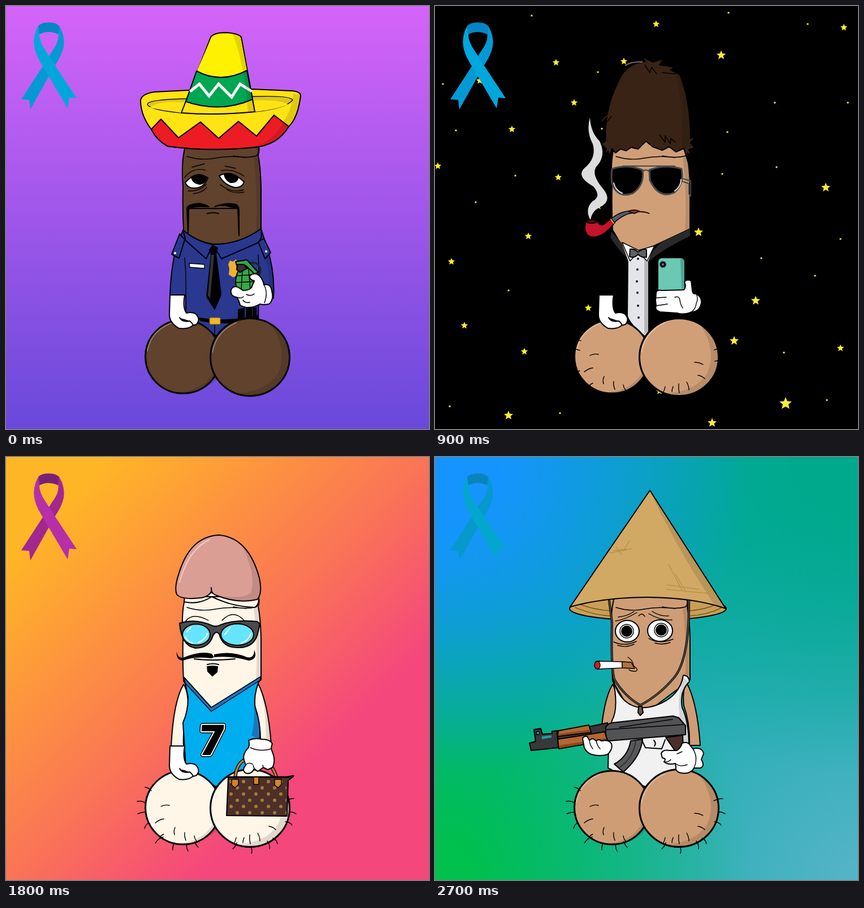
An HTML page for the animation above (3600 ms loop, 748 by 748 pixels).

```html
<!DOCTYPE html>
<html lang="en">
<head>
<meta charset="utf-8">
<title>Character cards</title>
<style>
html, body { margin: 0; width: 100%; height: 100%; overflow: hidden; background: #000 }
svg { display: block; width: 100vw; height: 100vh }
.scene { display: none }
.ink { stroke: #000; stroke-width: 2; stroke-linejoin: round; stroke-linecap: round; fill: none }
.thin { stroke-width: 1.4 }
.bold { stroke-width: 3 }
.flat { stroke: none }
.skin { fill: var(--skin) }
.shade { fill: #000; fill-opacity: .12; stroke: none }
.white { fill: #fff }
.black { fill: #000 }
</style>
</head>
<body>
<svg viewBox="0 0 748 748">
<defs>
  <linearGradient id="violet" x2="0" y2="1"><stop stop-color="#d564f9"/><stop offset="1" stop-color="#6849da"/></linearGradient>
  <linearGradient id="sunset" x2="1" y2="1"><stop offset=".12" stop-color="#ffb626"/><stop offset=".5" stop-color="#fa7456"/><stop offset=".72" stop-color="#f4487c"/></linearGradient>
  <radialGradient id="blue" cx="0" cy="0" r=".75"><stop offset=".2" stop-color="#1594ff"/><stop offset="1" stop-color="#1594ff" stop-opacity="0"/></radialGradient>
  <radialGradient id="jade" cx="1" cy="0" r=".75"><stop offset=".15" stop-color="#00a98b"/><stop offset="1" stop-color="#00a98b" stop-opacity="0"/></radialGradient>
  <radialGradient id="green" cx="0" cy="1" r=".75"><stop offset=".12" stop-color="#00c04e"/><stop offset="1" stop-color="#00c04e" stop-opacity="0"/></radialGradient>
  <radialGradient id="mist" cx="1" cy="1" r=".9"><stop offset=".05" stop-color="#52b4c6"/><stop offset="1" stop-color="#52b4c6" stop-opacity="0"/></radialGradient>
  <pattern id="dots" width="22" height="22" patternUnits="userSpaceOnUse" x="393" y="568">
    <circle cx="5" cy="6" r="3" fill="#a8783f"/><circle cx="16" cy="17" r="3" fill="#a8783f"/>
  </pattern>

  <g id="ribbon">
    <path fill="var(--r2)" d="M94 35Q105 53 102 72Q99 87 86 106L43 183L41 166L27 165L64 108L82 79Q95 62 92 47Z"/>
    <path fill="var(--r1)" d="M57 35Q47 53 50 72Q52 84 60 98L109 181L112 162L125 163L88 107L70 79Q58 62 59 47Z"/>
    <path fill="var(--r3)" d="M57 35Q63 29 75 29Q88 29 94 35L92 50Q75 42 59 50Z"/>
  </g>

  <g id="body" class="ink">
    <path class="skin" d="M318 240L315 257Q310 280 313 320Q312 360 314 396L340 440Q364 454 390 440L451 394V320Q450 285 446 264Q450 252 444 240Z"/>
    <path class="shade" d="M438 266Q446 330 442 400L451 394V320Q450 285 446 264Z"/>
    <path class="thin" d="M320 266Q345 274 370 269T425 268M402 265Q425 270 443 265Q448 259 445 253"/>
  </g>

  <g id="base" class="ink">
    <ellipse class="skin bold" cx="313" cy="620" rx="66.500" ry="65"/>
    <path class="shade" d="M305 683Q350 680 368 645L378 654Q350 688 305 683Z"/>
    <ellipse class="skin bold" cx="431.500" cy="621" rx="70" ry="68.500"/>
    <path class="shade" d="M470 565Q505 590 500 630Q490 675 450 687Q430 690 412 685Q462 680 481 650Q499 610 470 565Z"/>
    <path style="stroke:#fff;stroke-opacity:.3" d="M250 610Q256 575 292 561M365 612Q372 575 407 560"/>
  </g>

  <path id="folds" class="ink thin" d="M274 618q7-4 15-2M264 647q7-6 15-7M299 655q-3 6-1 13M316 664q-1 6 2 14M333 670q1 6 4 9M273 671q3-3 6-4M459 630q8 0 15 4M465 653q7 1 12 6M445 665q4 7 4 14M431 668q-1 8 1 16M407 673q-1 6-4 11M421 673q-2 5-2 9"/>
  <path id="hairs" class="ink thin" d="M257 590q-4-5-11-6M247 612q-7-5-15-3M246 628q-7 0-13 3M252 647q-6 4-7 10M278 672q-9 2-14 11M298 682q-4 6-3 13M320 684q-2 6 2 13M334 680q2 7 6 10M493 608q8-4 16-4M500 628q7-1 13 3M494 645q9 1 12 6M472 674q7 3 8 10M462 679q5 6 4 14M433 688q3 7 1 13M408 682q-2 7-7 11"/>

  <path id="restHand" class="ink white" d="M290 511H316Q312 533 319 543Q331 540 337 546Q344 555 337 563L330 565Q322 572 306 570Q288 560 289 544ZM307 551q5 9 18 6M325 557q5 4 6 8"/>
  <g id="bareArms" class="ink skin">
    <path d="M314 402Q296 432 292 512H314Q312 478 322 440Q322 414 314 402Z"/>
    <path d="M445 399Q464 435 469 510H450Q451 470 440 440Q437 412 445 399Z"/>
  </g>
</defs>

<g class="scene" style="--skin:#60422d;--r1:#00a7dc;--r2:#0499d5;--r3:#0586c6">
  <rect width="748" height="748" fill="url(#violet)"/>
  <use href="#ribbon"/>
  <use href="#body"/>
  <g class="ink">
    <path fill="#2a3890" d="M313 396L300 430Q291 470 290 512H318L318 545L371 583L446 560L447 505L473 517Q476 470 461 425L451 394Q410 423 366 421Q335 416 313 396Z"/>
    <path class="shade" d="M448 415Q468 460 466 512L474 517Q476 460 456 412ZM434 418L446 552H425Q442 480 434 418Z"/>
    <path class="thin" d="M316 445Q319 480 318 512M446 440Q448 470 447 505M369 560V580"/>
    <path fill="#2a3890" d="M313 396L318 415L354 447L366 422Q335 416 313 396ZM366 422L381 447L447 418L452 408L451 394Q410 423 366 421ZM307 403L316 413L306 446L293 439ZM446 417L456 411L468 436L458 447Z"/>
    <circle class="white flat" cx="299" cy="437" r="2"/><circle class="white flat" cx="460" cy="434" r="2"/>
    <path class="black" d="M360 431L366 424L374 428L371 439L380 510L369 536L355 514L363 440Z"/>
    <path class="flat" fill="#333" d="M363 440L368 440L361 517L357 512Z"/>
    <path class="white thin" d="M324 455L351 457V464L325 462Z"/>
    <path class="black" d="M341 552Q390 560 445 548L445 553Q390 566 344 556ZM411 537l10-2v18h-10ZM425 535l9-1v16h-9ZM437 534h5v16h-5Z"/>
    <path class="flat" fill="#f0b030" d="M396 450l5 2 6-4 2 4 3 1-3 12 3 9-10 6-8-5 1-11-2-7Z"/>
  </g>
  <use href="#base"/>
  <rect x="360" y="551" width="19" height="12" rx="2" fill="#f0b82c" stroke="#7a5500"/>
  <use href="#restHand"/>
  <g class="ink">
    <circle cx="437" cy="467" r="13" stroke="#222" stroke-width="3"/>
    <path fill="#39a648" d="M410 470Q425 458 438 470Q450 488 434 504H410Q402 488 410 470Z"/>
    <path class="thin" d="M409 477L440 475M406 489L443 487M418 466L416 503M429 465L432 502"/>
    <path fill="#39a648" d="M406 452L426 449L446 471L440 474L424 459L408 459Z"/>
    <path fill="#333" d="M409 457l12 0 5 7-12 7-6-5Z"/>
    <path class="white" d="M398 502Q401 494 410 497L419 503Q430 503 434 498L439 486Q430 484 431 477Q441 469 450 479Q455 486 456 493Q468 490 470 504Q474 520 465 527Q455 529 449 527Q430 538 414 529Q412 520 408 515Q396 513 398 502Z"/>
    <path class="thin" d="M456 493Q464 507 457 525M408 515Q416 518 420 514M419 520Q423 526 431 524M425 510q8 4 14-1"/>
  </g>
  <g class="ink">
    <path fill="#ffe313" d="M238 169Q237 156 262 152L322 149L436 147L505 150Q521 151 521 159Q516 198 500 213Q480 247 437 250Q360 258 286 248Q266 237 257 218Q239 195 238 169Z"/>
    <path class="thin" fill="#dfc51a" d="M250 174Q251 165 322 164L438 160Q502 158 507 166Q496 181 440 187Q370 194 310 189Q254 184 250 174Z"/>
    <path class="flat" fill="#ffe313" d="M254 180Q273 165 322 171L438 167Q484 165 499 174Q480 183 440 187Q370 194 310 189Z"/>
    <path fill="#ed1c24" d="M257 218L274 200L305 233L344 205L376 234L411 204L443 230L474 193L500 213Q480 247 437 250Q360 258 286 248Q266 237 257 218Z"/>
    <path class="shade" d="M508 155L521 158Q516 198 500 213Q480 247 437 250Q478 235 490 205Q505 185 508 155Z"/>
    <path fill="#ffe313" d="M310 189L362 55Q368 47 388 47Q410 48 416 55L440 187Q370 194 310 189Z"/>
    <path class="flat" fill="#fff200" d="M338 114L363 56Q369 49 388 49Q409 50 415 56L426 113Q380 137 338 114Z"/>
    <path fill="#00a651" d="M337 115Q380 138 426 114L436 165Q380 190 318 169Z"/>
    <path style="stroke:#fff;stroke-width:5;stroke-linejoin:miter" d="M327 150L342 138L359 159L376 138L399 161L414 138L433 150"/>
    <path class="shade" d="M401 50L416 55L440 187L428 188Q421 100 401 50Z"/>
  </g>
  <g class="ink">
    <path class="white" d="M317 312Q335 292 357 304Q350 323 331 322Q320 321 317 312ZM377 300Q398 289 421 311Q418 321 405 321Q386 317 377 300Z"/>
    <path class="black" d="M328 302Q342 294 355 303Q352 315 342 315Q329 313 328 302ZM386 298Q398 293 411 303Q408 313 397 312Q388 308 386 298Z"/>
    <path class="thin" d="M316 303Q330 285 352 290M381 291Q402 287 421 301M322 327Q343 328 354 315M331 332Q347 330 355 321M379 316Q399 332 420 325M391 325Q405 333 421 329M329 285L351 279M387 283L406 287"/>
    <path class="black" d="M322 402L320 358Q321 350 343 349Q352 351 359 355Q331 353 323 359ZM412 406L410 358L388 353Q371 352 369 355Q385 348 402 350Q413 350 412 365Z"/>
    <path d="M323 358H410M356 367Q366 364 376 367"/>
  </g>
</g>

<g class="scene" style="--skin:#d09f78;--r1:#00a7dc;--r2:#0499d5;--r3:#0586c6">
  <rect width="748" height="748"/>
  <path id="stars" fill="#ffed32"/>
  <use href="#ribbon"/>
  <use href="#body"/>
  <path d="M312 400L330 420L345 452L357 447L360 433L385 424L451 393V408Q400 430 382 452L372 583L342 560L320 520V440Z"/>
  <path fill="#29292a" d="M312 399L331 420L341 447Q323 430 310 409ZM451 394V407Q405 428 379 451Q383 429 404 416Z"/>
  <path fill="#e4e5e8" d="M331 420L360 432L387 424L377 452V575L371 583Q345 562 341 548L342 452Z"/>
  <path fill="#000" opacity=".2" d="M370 445L377 452V575L370 580Z"/>
  <g class="ink">
    <path class="white thin" d="M331 418L345 451L359 435L375 451L388 424L360 432Z"/>
    <path fill="#606064" d="M345 430Q352 429 359 435Q369 428 374 431V444Q366 446 359 439Q352 447 344 443Z"/>
  </g>
  <path stroke="#111" stroke-width="4" stroke-linecap="round" d="M359 447h0M358 466h0M357 487h0M358 507h0M359 530h0M360 551h0"/>
  <use href="#base"/><use href="#folds"/>
  <path class="ink thin" d="M251 590l7 2M249 607l7 2M247 648l9-3M494 608l7-2M495 628l6-1"/>
  <use href="#restHand"/>
  <g class="ink">
    <rect x="394" y="445" width="47" height="66" rx="7" fill="#6bc8b3"/>
    <path class="flat" fill="#4da590" d="M434 446Q441 446 441 453V502H436Z"/>
    <circle class="black" cx="403" cy="457" r="5" style="stroke:#234"/><circle class="flat" fill="#777" cx="403" cy="457" r="2"/>
    <path class="white" d="M391 507Q392 501 401 503L440 502Q445 497 441 488Q445 482 453 486L455 503Q455 510 462 509Q472 515 471 525Q468 541 454 541Q440 547 428 543L398 541Q388 538 391 530L390 521Z"/>
    <path class="thin" d="M391 516L409 515M392 530L411 527M424 515q8-3 9 5t5 14M462 509q4 9 0 17-1 9-8 15"/>
    <path fill="#382315" d="M299 265L303 253L294 244L302 238Q298 180 330 122Q344 101 372 98L365 89L385 99L405 93L397 104L423 108L416 113L433 121Q452 170 452 234L461 231L452 242L459 251L449 254L453 264L446 260L449 281L440 252L426 258L414 249L402 255L385 249L373 239L359 253L347 250L338 256L328 253L319 260L313 252L309 266L306 257Z"/>
    <path class="shade" d="M425 119Q442 180 436 254L452 250Q454 170 433 121Z"/>
    <path class="thin" d="M371 104L380 118L383 108L392 120M397 228L407 241L407 229L416 244L417 234L425 241M303 206L312 195M402 118L425 120"/>
    <path style="stroke:#8d7a6c" d="M337 105Q347 98 366 99"/>
    <path style="stroke:#382315" d="M296 203Q301 193 313 193"/>
    <g class="black" style="stroke:#48484a">
      <path class="bold" d="M313 288Q340 279 367 290Q371 316 350 331Q323 341 313 314Q311 300 313 288ZM379 290Q407 279 436 288Q441 315 423 330Q396 342 380 308Z"/>
      <path fill="none" d="M332 283H424M366 294q7-8 14 0M437 305L452 309V337L449 332V314L437 310"/>
    </g>
    <path style="stroke:#ddd" d="M316 313Q319 326 331 331M424 327Q435 319 435 307"/>
    <path fill="#ddd" class="flat" d="M274 197Q275 223 291 239Q303 264 287 282Q274 296 297 323Q315 345 291 356Q277 363 275 379Q264 358 279 345Q295 337 280 319Q248 301 265 286Q286 268 279 244Q267 222 274 197Z"/>
    <path fill="#c4132b" d="M266 381Q277 375 287 381Q294 392 302 383L312 376L318 383Q303 403 286 408Q266 412 265 391Z"/>
    <ellipse fill="#570914" cx="277" cy="381" rx="9" ry="3"/>
    <path fill="#555e66" class="thin" d="M312 376Q328 362 350 362V366Q335 367 317 383Z"/>
    <path style="stroke:#e7ad4a" d="M311 377L316 384"/>
    <path class="thin" fill="#912b2c" d="M342 363Q352 358 362 363L352 367ZM358 364Q369 362 379 367"/>
  </g>
</g>

<g class="scene" style="--skin:#fff6e8;--r1:#b62fa8;--r2:#a2278f;--r3:#7b2077">
  <rect width="748" height="748" fill="url(#sunset)"/>
  <use href="#ribbon"/>
  <use href="#body"/><use href="#bareArms"/>
  <g class="ink">
    <path fill="#00aeef" d="M315 390L363 443L451 388Q436 420 441 446Q450 470 449 500L446 560L371 583L318 548L313 470Q322 450 322 425Z"/>
    <path fill="#1c75bc" class="thin" d="M315 390L363 443L451 388L449 395L363 450L317 400Z"/>
    <path fill="#1c75bc" class="flat" d="M442 451Q449 470 448 500L434 492Q441 470 438 435Z"/>
    <path class="flat shade" d="M456 424L469 507H460Q460 450 452 418Z"/>
  </g>
  <g font-family="Roboto, Arial, sans-serif" font-size="72" font-weight="900" text-anchor="middle" stroke-linejoin="round" transform="translate(362 526) skewX(-5)">
    <text stroke="#000" stroke-width="9">7</text>
    <text stroke="#fff" stroke-width="6">7</text>
    <text stroke="#000" stroke-width="2">7</text>
  </g>
  <use href="#base"/><use href="#folds"/><use href="#hairs"/><use href="#restHand"/>
  <g class="ink">
    <path style="stroke-width:6" d="M405 577Q404 532 438 532T481 577"/>
    <path style="stroke:#c07a3d;stroke-width:3.500" d="M405 577Q404 532 438 532T481 577"/>
    <path fill="#4d3027" d="M393 566H497L508 565L499 572L497 635L390 634Z"/>
    <path fill="url(#dots)" class="flat" d="M393 568H496L496 633L391 633Z"/>
    <path class="bold" d="M392 566H497L508 564"/>
    <g class="thin" fill="#d6822e"><path d="M399 570h12v9l-6 6-6-5ZM475 570h12v9l-6 6-6-5Z"/><rect x="438" y="566" width="9" height="13"/></g>
    <path class="white" d="M429 501Q440 496 452 499Q467 499 471 507Q468 514 470 519Q478 537 471 549L463 553L455 549L445 556L439 551Q434 562 424 559Q416 554 424 545L421 536Q418 527 426 517Q432 512 429 501Z"/>
    <path class="thin" d="M432 514Q450 522 469 516M424 545Q428 539 436 543M439 551L437 545M455 549L454 545"/>
    <path class="skin" d="M316 247L315 256Q340 262 364 247Q400 265 440 266Q449 260 446 247Z"/>
    <path fill="#db9e95" d="M302 243Q297 231 306 205Q326 140 377 138Q429 143 448 214Q454 242 444 252Q410 260 373 245Q362 242 363 231Q366 244 346 249Q310 253 302 243Z"/>
    <path class="shade" d="M418 158Q443 187 448 214Q454 242 444 252Q410 260 373 245Q420 252 433 240Q443 210 418 158Z"/>
    <path class="thin" d="M318 290Q330 274 358 289M382 289Q402 268 421 289"/>
    <path style="stroke:#fff;stroke-opacity:.5" d="M307 221Q322 164 360 146"/>
    <path fill="#4b4b4d" d="M307 294Q335 285 364 298Q372 301 379 297Q405 287 444 291L449 295L446 308Q441 338 409 337Q383 337 377 313Q371 306 366 316Q359 338 335 338Q310 334 307 294Z"/>
    <ellipse fill="#66e4fb" cx="336.500" cy="314" rx="24.500" ry="18.500"/>
    <ellipse fill="#66e4fb" cx="409" cy="314" rx="29" ry="19"/>
    <path style="stroke:#fff" d="M317 318Q321 327 330 329M320 309L327 301M340 328Q353 323 356 312M387 314L397 301M416 329Q430 324 433 312"/>
    <path class="black flat" d="M302 344Q303 356 313 355Q345 342 364 348L368 354L363 356Q333 352 313 360Q300 359 302 344ZM368 349Q399 342 426 354Q439 357 439 341Q446 358 429 360Q399 351 368 354Z"/>
    <path d="M333 357Q363 361 405 357M356 367Q366 364 376 367"/>
    <path class="black" d="M356 371Q365 369 374 371L373 380L365 387L357 379Z"/>
  </g>
</g>

<g class="scene" style="--skin:#ce9d76;--r1:#04a6cf;--r2:#0798cc;--r3:#0884bd">
  <rect width="748" height="748" fill="#06a8a9"/>
  <rect width="748" height="748" fill="url(#mist)"/><rect width="748" height="748" fill="url(#jade)"/>
  <rect width="748" height="748" fill="url(#green)"/><rect width="748" height="748" fill="url(#blue)"/>
  <use href="#ribbon"/>
  <g class="ink">
    <ellipse fill="#c99f58" cx="376.500" cy="268" rx="138.500" ry="21"/>
    <path class="thin" style="stroke:#76571f" d="M248 266Q280 280 312 281M255 260Q280 270 310 272M451 281Q482 279 506 267M451 272Q480 269 496 261"/>
  </g>
  <use href="#body"/><use href="#bareArms"/>
  <g class="ink">
    <path fill="#f1f1f2" d="M315 393Q324 427 346 438Q364 448 391 439Q433 424 439 386Q448 385 450 397Q432 415 437 443Q450 470 449 520L446 560L371 583L306 550Q307 490 313 466Q325 445 315 393Z"/>
    <path class="shade" d="M439 390Q428 425 432 450L437 550H446L449 510Q449 470 437 443Q432 415 448 397Z"/>
    <path fill="#d1a964" d="M380 59L239 265Q300 248 376 248Q460 249 514 268Z"/>
    <path class="shade" d="M380 59Q421 150 493 260L514 268Z"/>
    <path class="thin" style="stroke:#a8803d;stroke-opacity:.6" d="M309 170L348 162M315 166L338 163M320 159L330 172M344 148L333 166M411 226L466 234M409 234L482 241M413 190L437 236M425 207L444 239"/>
    <path d="M308 254L313 292Q311 370 317 393Q335 423 363 439Q397 421 423 390Q450 357 449 254" style="stroke-width:4"/>
    <path d="M308 254L313 292Q311 370 317 393Q335 423 363 439Q397 421 423 390Q450 357 449 254" style="stroke:#554b42"/>
    <path fill="#67594d" d="M360 441h6l2 11-5 5-4-5Z"/>
    <path class="thin" d="M319 290Q335 288 357 275M324 283Q342 281 352 273M378 277Q397 289 419 288M384 273Q398 282 413 281M360 281q6-7 11 1M316 327Q336 336 356 326M323 333Q338 338 352 331M378 321Q397 332 421 322M389 329Q402 333 416 328"/>
    <ellipse class="white" cx="340" cy="308" rx="21" ry="19"/><ellipse class="white" cx="398" cy="307" rx="22" ry="19"/>
    <g class="thin"><circle cx="339" cy="308" r="12"/><circle cx="400" cy="306" r="12"/></g>
    <circle class="black flat" cx="339" cy="308" r="10"/><circle class="black flat" cx="400" cy="306" r="10"/>
    <path class="thin" d="M341 354Q350 359 351 369Q362 377 354 379Q346 379 343 376"/>
    <path class="white thin" d="M287 361L331 362V373L287 375Z"/>
    <path fill="#b0733f" class="thin" d="M331 362L347 363L353 374L331 373Z"/>
    <ellipse fill="#d21c20" class="thin" cx="287" cy="368" rx="5" ry="7"/>
  </g>
  <use href="#base"/><use href="#folds"/><use href="#hairs"/>
  <g class="ink">
    <path fill="#38383a" d="M167 506L178 503L175 482L187 480L190 490L207 489V485L216 484L218 514L170 519Z"/>
    <circle fill="#1aa1a0" class="thin" cx="182" cy="488" r="3"/>
    <path fill="#1aa1a0" class="flat" d="M189 494L206 492V496L189 499Z"/>
    <path fill="#58585b" d="M346 502L367 499Q364 530 333 557L317 543Q341 530 346 502Z"/>
    <path style="stroke:#333" d="M355 503Q350 533 326 549"/>
    <path fill="#38383a" d="M216 489L305 470L311 500L219 512Z"/>
    <path fill="#b36732" d="M218 484L272 474L276 487L217 494ZM217 499L300 486L305 501L219 516Z"/>
    <path class="flat" fill="#8e481f" d="M219 490L274 482L275 486L218 493ZM219 510L304 497L304 500L220 515Z"/>
    <path fill="#535355" d="M302 478Q304 472 313 470L421 458L431 461L443 475V491L307 502Q301 498 302 478Z"/>
    <path class="thin" d="M304 482L442 473M326 478L420 464"/>
    <path d="M366 501L372 514L401 516L407 500M387 501q5 5 1 10"/>
    <path fill="#49302a" d="M408 496L438 492L439 521L427 523Z"/>
    <path class="white" d="M261 498Q263 493 269 494L273 501Q278 497 281 499L285 502Q290 498 294 502L302 501Q309 502 312 507Q315 517 305 526Q292 530 277 526Q268 523 264 514Z"/>
    <path class="thin" d="M273 501Q274 510 279 516M285 502Q287 511 292 516"/>
    <path class="white" d="M400 525Q402 517 414 519L427 519Q434 516 437 506Q447 502 452 511L456 516Q472 512 475 524L471 535Q478 547 469 550L458 550Q452 561 437 559Q424 557 426 548L425 542Q412 545 405 539Q410 533 402 532Z"/>
    <path class="thin" d="M405 539Q413 540 417 535M425 542Q434 549 446 544M456 516Q466 531 458 550M428 525L437 521"/>
  </g>
</g>
</svg>
<script>
const HOLD = 900;
const scenes = [...document.querySelectorAll('.scene')];

function star(x, y, r) {
  const points = Array.from({ length: 10 }, (_, i) => {
    const a = i * Math.PI / 5, d = i % 2 ? r * .45 : r;
    return `${(x + d * Math.sin(a)).toFixed(1)} ${(y - d * Math.cos(a)).toFixed(1)}`;
  });
  return `M${points.join('L')}Z`;
}

// Star centres, keyed by radius
const sky = {
  2.5: '171,17 519,12 659,32 288,117 14,138 601,171 730,171 37,220 295,217 517,223 604,285 142,300 508,297 72,347 717,412 577,446 672,477 130,503 617,613 26,708 221,720 693,697',
  6.5: '391,32 723,38 214,100 334,98 246,171 136,218 5,283 218,303 165,407 29,452 271,534 52,565 158,611 717,605 79,132 289,354 397,681',
  8.5: '506,87 691,321 567,521 529,592 130,724 490,737 466,400',
  11.5: '620,703'
};
document.getElementById('stars').setAttribute('d', Object.entries(sky).flatMap(([r, list]) =>
  list.split(' ').map(p => star(...p.split(',').map(Number), +r))).join(''));

function draw() {
  const current = Math.floor(performance.now() / HOLD) % scenes.length;
  scenes.forEach((scene, i) => scene.style.display = i === current ? 'inline' : 'none');
  requestAnimationFrame(draw);
}
draw();
</script>
</body>
</html>
```
